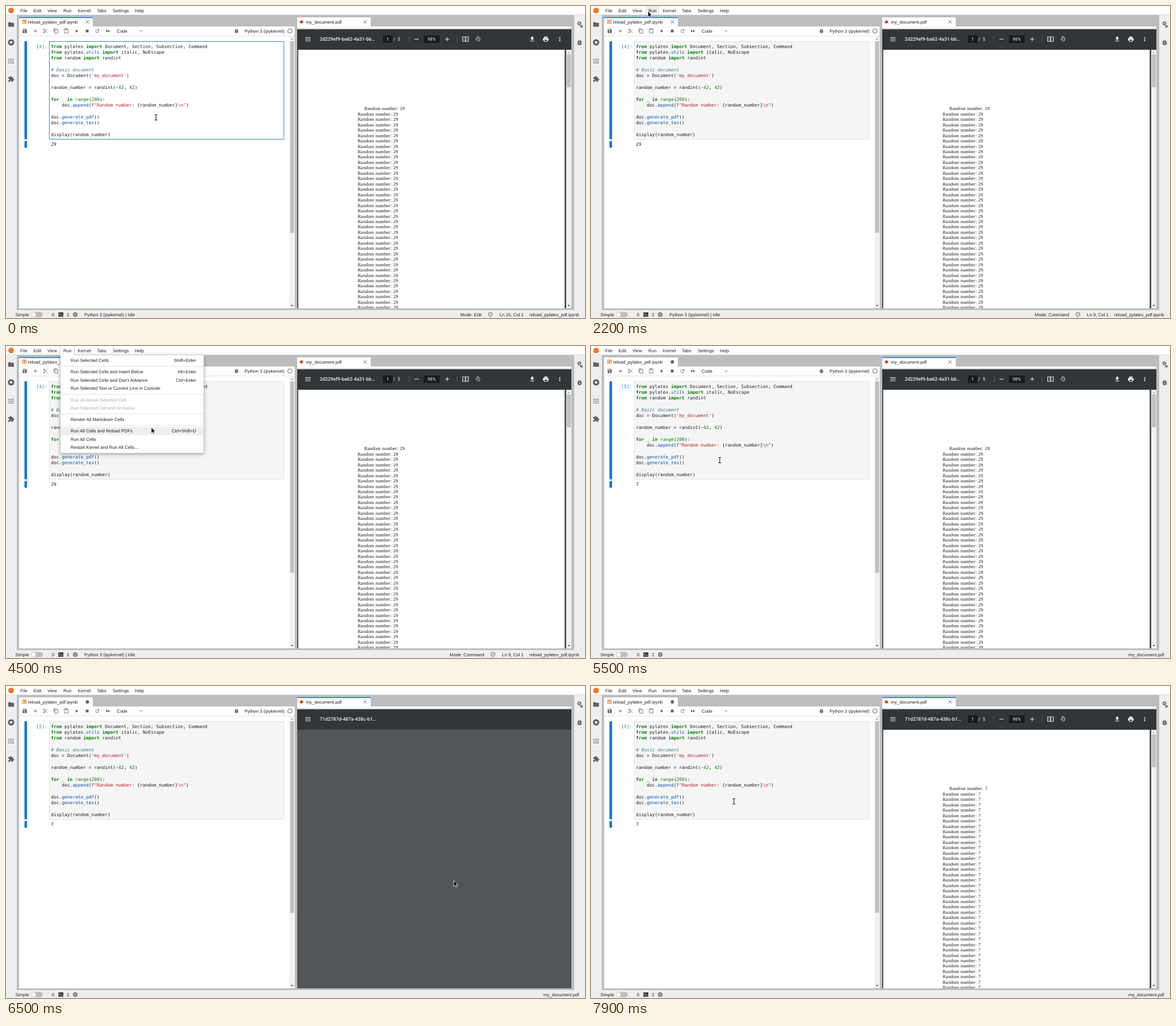
Recreate the animation shown at these times as an HTML page. Size 1020 by 549 pixels, loop 8 s.

```html
<!DOCTYPE html>
<html lang="en">
<head>
<meta charset="utf-8">
<title>Run all cells and reload PDFs</title>
<style>
html, body { margin: 0; width: 100%; height: 100%; overflow: hidden; background: #fff; }
svg { display: block; width: 1020px; height: 549px; }
text { font: 7.9px "Liberation Sans", Arial, sans-serif; fill: #212121; white-space: pre; text-rendering: geometricPrecision; }
.mono { font-family: "DejaVu Sans Mono", monospace; }
.pdf { font: 8.2px "Liberation Serif", serif; letter-spacing: .16px; word-spacing: .6px; fill: #111; }
.bar { font-family: Roboto, sans-serif; fill: #f1f1f1; }
.title { font-size: 8.4px; font-weight: 500; }
.off { fill: #adadad; }
.prompt { fill: #307fc1; }
.k { fill: #008000; font-weight: bold; }
.n { fill: #008000; }
.s { fill: #ba2121; }
.c { fill: #408080; font-style: italic; }
.o { fill: #aa22ff; font-weight: bold; }
.p { fill: #0055aa; }
.menu { filter: drop-shadow(0 2px 2px rgba(0,0,0,.2)) drop-shadow(0 1px 4px rgba(0,0,0,.14)); }
</style>
</head>
<body>
<svg id="stage" viewBox="0 0 1020 549"></svg>
<script>
const LOOP = 8000, STEP = 100;
const BLUE = '#1976d2', GREY = '#bdbdbd', LIGHT = '#eeeeee', ICON = '#616161';

const rect = (x, y, w, h, fill, more = '') =>
  `<rect x="${x}" y="${y}" width="${w}" height="${h}" fill="${fill}" ${more}/>`;
const circle = (x, y, r, fill, more = '') =>
  `<circle cx="${x}" cy="${y}" r="${r}" fill="${fill}" ${more}/>`;
// y is the middle of the capitals
const text = (s, x, y, cls = '', anchor = 'start') =>
  `<text x="${x}" y="${y + 2.8}" class="${cls}" text-anchor="${anchor}" xml:space="preserve">${s}</text>`;
const line = (d, color, width = 1) =>
  `<path d="${d}" fill="none" stroke="${color}" stroke-width="${width}"/>`;
const place = (x, y, s) => `transform="translate(${x - 12 * s} ${y - 12 * s}) scale(${s})"`;
// icons live in a 24 unit box, centred on x, y
const icon = (name, x, y, s = .405, color = ICON) =>
  `<path d="${FILLED[name]}" ${place(x, y, s)} fill="${color}" fill-rule="evenodd"/>`;
const outline = (name, x, y, s = .405, color = ICON, width = 2) =>
  `<path d="${LINED[name]}" ${place(x, y, s)} fill="none" stroke="${color}" stroke-width="${width}"/>`;

const FILLED = {
  folder: 'M10 4H4a2 2 0 0 0-2 2v12a2 2 0 0 0 2 2h16a2 2 0 0 0 2-2V8a2 2 0 0 0-2-2h-8z',
  running: 'M12 1a11 11 0 0 0 0 22 11 11 0 0 0 0-22zM8 8h8v8H8z',
  list: 'M2 4h3v3H2zM7 4.5h15v2H7zM2 10.5h3v3H2zM7 11h15v2H7zM2 17h3v3H2zM7 17.5h15v2H7z',
  puzzle: 'M20.5 11H19V7a2 2 0 0 0-2-2h-4V3.5a2.5 2.5 0 0 0-5 0V5H4a2 2 0 0 0-2 2v3.8h1.5a2.7 2.7 0 0 1 0 5.4H2V20a2 2 0 0 0 2 2h3.8v-1.5a2.7 2.7 0 0 1 5.4 0V22H17a2 2 0 0 0 2-2v-4h1.5a2.5 2.5 0 0 0 0-5z',
  bug: 'M12 5a6 6 0 0 1 6 6v4a6 6 0 0 1-12 0v-4a6 6 0 0 1 6-6zM10 10h4v2h-4zM10 14h4v2h-4zM4 8h2.8v2H4zM4 12h2v2H4zM4 16h2.8v2H4zM17.2 8H20v2h-2.8zM18 12h2v2h-2zM17.2 16H20v2h-2.8zM7 4.4 8.4 3 11 5.2 9.4 6zM17 4.4 15.6 3 13 5.2 14.6 6z',
  save: 'M17 3H5a2 2 0 0 0-2 2v14a2 2 0 0 0 2 2h14a2 2 0 0 0 2-2V7zM12 13a3 3 0 0 1 0 6 3 3 0 0 1 0-6zM5 5h10v4H5z',
  add: 'M19 13h-6v6h-2v-6H5v-2h6V5h2v6h6z',
  run: 'M8 5v14l11-7z',
  stop: 'M6 6h12v12H6z',
  forward: 'M4 18l8.5-6L4 6zM13 6v12l8.5-6z',
  restart: 'M17.65 6.35A8 8 0 1 0 19.73 14h-2.08A6 6 0 1 1 16.22 7.78L13 11h7V4z',
  download: 'M19 9h-4V3H9v6H5l7 7zM5 18v2h14v-2z',
  print: 'M19 8H5a3 3 0 0 0-3 3v6h4v4h12v-4h4v-6a3 3 0 0 0-3-3zM8 14h8v5H8zM18 10h2v2h-2zM6 3h12v4H6z',
  more: 'M10 4h4v4h-4zM10 10h4v4h-4zM10 16h4v4h-4z',
  burger: 'M2 5h20v2H2zM2 11h20v2H2zM2 17h20v2H2z',
  minus: 'M5 11h14v2H5z'
};
const LINED = {
  cut: 'M9 6a3 3 0 1 0-6 0 3 3 0 0 0 6 0zM9 18a3 3 0 1 0-6 0 3 3 0 0 0 6 0zM8 8l13 12.5M8 16 21 3.5',
  copy: 'M3 17V2h13M7 6h13v16H7z',
  paste: 'M4 3h16v18H4zM8 3v3h8V3M10 2h4',
  chevron: 'M6 9l6 6 6-6',
  close: 'M5 5l14 14M19 5 5 19',
  shield: 'M12 2 4 5v6c0 5 3.4 9.7 8 11 4.6-1.3 8-6 8-11V5zM8 12l3 3 5-6',
  globe: 'M12 2a10 10 0 0 0 0 20 10 10 0 0 0 0-20zM2.5 9h19M2.5 15h19M12 2c-6 6-6 14 0 20M12 2c6 6 6 14 0 20',
  fit: 'M2 4h20v16H2zM12 7v10M9 9l3-2 3 2M9 15l3 2 3-2M5 12h2M17 12h2',
  rotate: 'M11 4a8.5 8.5 0 1 1 0 17M12 0 8 4l4 4M8 8.5 13 13l-5 5-5-5z'
};

const CODE = [
  '<k from> pylatex <k import> Document, Section, Subsection, Command',
  '<k from> pylatex.<p utils> <k import> italic, NoEscape',
  '<k from> random <k import> randint',
  '',
  '<c # Basic document>',
  "doc <o => Document(<s 'my_document'>)",
  '',
  'random_number <o => randint(<o -><n 42>, <n 42>)',
  '',
  '<k for> _ <k in> <n range>(<n 200>):',
  '    doc.<p append>(<s f"Random number: >{random_number}<s \\n">)',
  '',
  'doc.<p generate_pdf>()',
  'doc.<p generate_tex>()',
  '',
  'display(random_number)'
].map((s, i) => text(s.replace(/<(\w) (.*?)>/g, '<tspan class="$1">$2</tspan>'), 79.3, 71 + i * 10.33, 'mono')).join('');

const MENUBAR = [['File', 25], ['Edit', 48.5], ['View', 73], ['Run', 101], ['Kernel', 126.5],
  ['Tabs', 160], ['Settings', 188], ['Help', 227]];
const HOVER = [[43, 68], [68, 95], [96, 121]];
const MENU = [
  ['Run Selected Cells', 25.5, 'Shift+Enter'],
  ['Run Selected Cells and Insert Below', 45.5, 'Alt+Enter'],
  ['Run Selected Cells and Don\'t Advance', 60, 'Ctrl+Enter'],
  ['Run Selected Text or Current Line in Console', 74.5],
  ['Run All Above Selected Cell', 95, '', 'off'],
  ['Run Selected Cell and All Below', 109.5, '', 'off'],
  ['Render All Markdown Cells', 129.5],
  ['Run All Cells and Reload PDFs', 149.5, 'Ctrl+Shift+D'],
  ['Run All Cells', 164],
  ['Restart Kernel and Run All Cells…', 178.5]
];

// pointer moves: start, end, x, y
const MOVES = [
  [0, 0, 264.3, 196], [200, 500, 232.6, 152], [700, 700, 232.4, 152.2],
  [1200, 1900, 61, 9], [2100, 2200, 100.4, 9], [3700, 3700, 255.5, 146],
  [3900, 3900, 254.6, 145.5], [4500, 4500, 256, 143], [5200, 5200, 234, 186],
  [5500, 5500, 226.8, 201], [6100, 6100, 610.5, 301.5], [6500, 6500, 788.8, 342],
  [6800, 6800, 769, 337], [7000, 7000, 744, 335], [7300, 7300, 568, 265],
  [7600, 7600, 254.3, 204], [7900, 7900, 251.8, 203]
];

function pointer(t) {
  let x = 0, y = 0;
  for (const [start, end, toX, toY] of MOVES) {
    if (t < start) break;
    const p = Math.min(1, (t - start + STEP) / (end - start + STEP));
    const e = p * p * (3 - 2 * p);
    x += (toX - x) * e;
    y += (toY - y) * e;
  }
  return [x, y];
}

function drawPointer(x, y, beam) {
  const at = `<g transform="translate(${x} ${y})">`;
  if (beam) {
    const d = 'M-2.4-4.8H-.8L0-4.2.8-4.8H2.4M0-4.2V4.2M-2.4 4.8H-.8L0 4.2.8 4.8H2.4';
    return at + line(d, '#fff', 2.2) + line(d, '#111', 1.1) + '</g>';
  }
  return at + '<path d="M0 0V10.6L2.4 8.4 4 12 5.7 11.2 4.1 7.7H7.4Z" fill="#000" stroke="#fff" stroke-width=".8"/></g>';
}

function scrollbar(x, w, top, thumbTop, thumbEnd) {
  const m = x + w / 2;
  return rect(x, top, w, 532 - top, '#f1f1f1') +
    rect(x + 1, thumbTop, w - 2, thumbEnd - thumbTop, '#c1c1c1') +
    `<path d="M${m - 2.2} ${top + 6}h4.4l-2.2-2.6z" fill="#a3a3a3"/>` +
    `<path d="M${m - 2.2} 526h4.4l-2.2 2.6z" fill="#505050"/>`;
}

function tab(x, w, name, active) {
  return rect(x, 20, w, 16.5, '#fff') + (active ? rect(x, 19.7, w, 1.5, BLUE) : '') + text(name, x + 15.5, 28);
}

const gear = (x, y, r) => circle(x, y, r, 'none', `stroke="${ICON}" stroke-width="1.3"`) +
  circle(x, y, r + 1.1, 'none', `stroke="${ICON}" stroke-width="1.1" stroke-dasharray="${(r + 1.1) * Math.PI / 8}"`);

function sidebars() {
  return rect(0, 16, 19, 519, LIGHT) + rect(1001, 16, 19, 519, LIGHT) +
    icon('folder', 9, 32.5, .507) + icon('running', 9, 64, .507) +
    icon('list', 9, 97, .507) + icon('puzzle', 9, 128.5, .507) +
    gear(1010, 30.5, 2) + gear(1013.7, 35.8, 1.1) + icon('bug', 1010.5, 64.5, .507);
}

function notebook(s) {
  const tools = [['save', 33], ['add', 51.7], ['run', 124.5], ['stop', 143], ['restart', 161], ['forward', 179.5], ['bug', 406]];
  const lined = [['cut', 69.5], ['copy', 88], ['paste', 106], ['chevron', 238]];
  return rect(23, 36, 485.5, 496, '#fff') + tab(23, 130, 'reload_pylatex_pdf.ipynb', !s.done) +
    rect(29.3, 24.6, 6, 6, 'none', 'stroke="#ef6c00"') + rect(31, 26, 3, 2.6, '#ef6c00') +
    (s.done ? circle(143.3, 28, 3, ICON) : outline('close', 143.3, 28, .405, '#424242', 2)) +
    rect(23, 52.3, 485.5, 1, '#e0e0e0') +
    tools.map(([n, x]) => icon(n, x, 44)).join('') + lined.map(([n, x]) => outline(n, x, 44)).join('') +
    text('Code', 195, 44) + text('Python 3 (ipykernel)', 420.3, 44) +
    circle(500.2, 44, 3.9, 'none', `stroke="${ICON}"`) +
    scrollbar(499.5, 9, 53, 62, 399) +
    rect(32.5, 62, 4.6, 172.8, BLUE, 'rx="1"') + rect(32.5, 237.5, 4.6, 12, BLUE, 'rx="1"') +
    rect(76.3, 62.6, 413.3, 171.8, s.edit ? '#fff' : '#f5f5f5', `stroke="${s.edit ? BLUE : '#e0e0e0'}" stroke-width=".9"`) +
    text(`[${s.count}]:`, 72.3, 71, 'mono prompt', 'end') + CODE + text(s.output, 79.3, 243, 'mono');
}

function pdfPage(number) {
  let out = rect(515, 77, 469, 455, '#fff');
  for (let i = 0; i < 38; i++)
    out += text('Random number: ' + number, i ? 619.5 : 631.2, 180.5 + i * 9.46, 'pdf');
  return out + scrollbar(987, 9, 77, 85, 143);
}

function pdfTools() {
  const W = '#f1f1f1';
  return rect(664, 51.5, 17, 13.5, '#191b1c') + text('1', 672.5, 58, 'bar', 'middle') +
    text('/', 682, 58, 'bar') + text('5', 690, 58, 'bar') +
    rect(709.8, 53, .7, 10.5, '#6c6f71') + rect(794, 53, .7, 10.5, '#6c6f71') +
    icon('minus', 723.3, 58.3, .507, W) + rect(736, 52, 28, 13, '#191b1c') +
    text('98%', 750, 58, 'bar', 'middle') + icon('add', 777.2, 58.3, .507, W) +
    outline('fit', 809.5, 58.3, .507, W) + outline('rotate', 831.5, 58, .45, W) +
    icon('download', 927, 58.3, .507, W) + icon('print', 951, 58.3, .507, W) + icon('more', 975.5, 58.3, .45, W);
}

function viewer(s) {
  let out = tab(513, 129.5, 'my_document.pdf', s.done) + circle(520.5, 28, 2.8, '#d84315') +
    outline('close', 632.5, 28, .405, '#424242', 2) +
    rect(513, 36, 483, 3.5, '#fff') + rect(513, 39, 483, 2, '#d5d5d5') + rect(513, 41, 483, 491, '#525659');
  if (s.loaded) out += pdfPage(s.fresh ? 7 : 29);
  if (s.loaded || s.header)
    out += rect(513, 76, 483, 1.5, '#000', 'opacity=".18"') + rect(513, 41, 483, 35.2, '#323639') +
      icon('burger', 531.8, 58.3, .48, '#f1f1f1') +
      text(s.fresh ? '71d2787d-487a-438c-b1…' : '2d229ef9-ba62-4a31-bb…', 552.7, 58, 'bar title');
  return out + (s.loaded ? pdfTools() : '');
}

function statusBar(s) {
  let out = rect(0, 535, 1020, 14, LIGHT) + text('Simple', 16.5, 543) +
    rect(44, 538.6, 21, 9, GREY, 'rx="4.5"') + circle(48.6, 543.1, 3.8, '#fff') +
    text('0', 80.7, 543) + rect(92.3, 539, 8.7, 8, '#424242') +
    line('M94 541l1.6 1.6-1.6 1.6M96.5 545h3', '#fff', .8) +
    text('2', 107, 543) + outline('globe', 122, 543, .37, '#424242', 2);
  if (s.done) return out + text('my_document.pdf', 1009.6, 543, '', 'end');
  const shift = s.line < 10 ? 4.4 : 0;
  return out + text('Python 3 (ipykernel) | Idle', 138, 543) +
    text('Mode: ' + s.mode, 838 + shift, 543, '', 'end') + outline('shield', 853.4 + shift, 543, .4, '#424242') +
    text(`Ln ${s.line}, Col 1`, 912, 543, '', 'end') +
    text('reload_pylatex_pdf.ipynb', 1009.6, 543, '', 'end');
}

function menuBar(s, x, y) {
  const hover = y < 15 && HOVER.find(([a, b]) => x >= a && x < b);
  return rect(0, 0, 1020, 15.5, '#fff') + circle(9, 8, 5, '#f37726') +
    (hover ? rect(hover[0], 0, hover[1] - hover[0], 15.5, LIGHT) : '') +
    (s.menu ? runMenu() : '') + MENUBAR.map(([n, left]) => text(n, left, 8.3)).join('');
}

function runMenu() {
  return rect(95.6, 15.6, 253, 173, '#fff', `class="menu" stroke="${GREY}" stroke-width=".7"`) +
    rect(95.6, -1, 25, 17.2, '#fff') + line('M95.6 0V16M120.6 0V15.6', GREY, .7) +
    rect(96, 142.2, 252.2, 14.6, LIGHT) +
    [35.3, 84.8, 119.3, 139.4].map(y => rect(96, y, 252.2, .7, '#d5d5d5')).join('') +
    MENU.map(([name, y, keys = '', cls]) => text(name, 113.8, y, cls) + text(keys, 335, y, '', 'end')).join('');
}

function scene(t) {
  const [x, y] = pointer(t);
  const s = {
    edit: t < 2200,
    mode: t < 2200 ? 'Edit' : 'Command',
    line: t < 1200 ? 15 : 9,
    menu: t >= 3700 && t < 4900,
    done: t >= 5200,
    count: t < 4900 ? 4 : t < 5200 ? '*' : 5,
    output: t < 4900 ? 29 : t < 5200 ? '' : 7,
    fresh: t >= 5700,
    header: t >= 6500,
    loaded: t < 5700 || t >= 6800
  };
  const beam = !s.menu && x > 76 && x < 490 && y > 62 && y < 235;
  return rect(0, 0, 1020, 549, GREY) + sidebars() + notebook(s) + viewer(s) +
    rect(19, 532, 982, 3, GREY) + statusBar(s) + menuBar(s, x, y) + drawPointer(x, y, beam);
}

const stage = document.getElementById('stage');
let shown = -1;
function frame() {
  const t = Math.floor(performance.now() % LOOP / STEP) * STEP;
  if (t !== shown) stage.innerHTML = scene(shown = t);
  requestAnimationFrame(frame);
}
frame();
</script>
</body>
</html>
```
